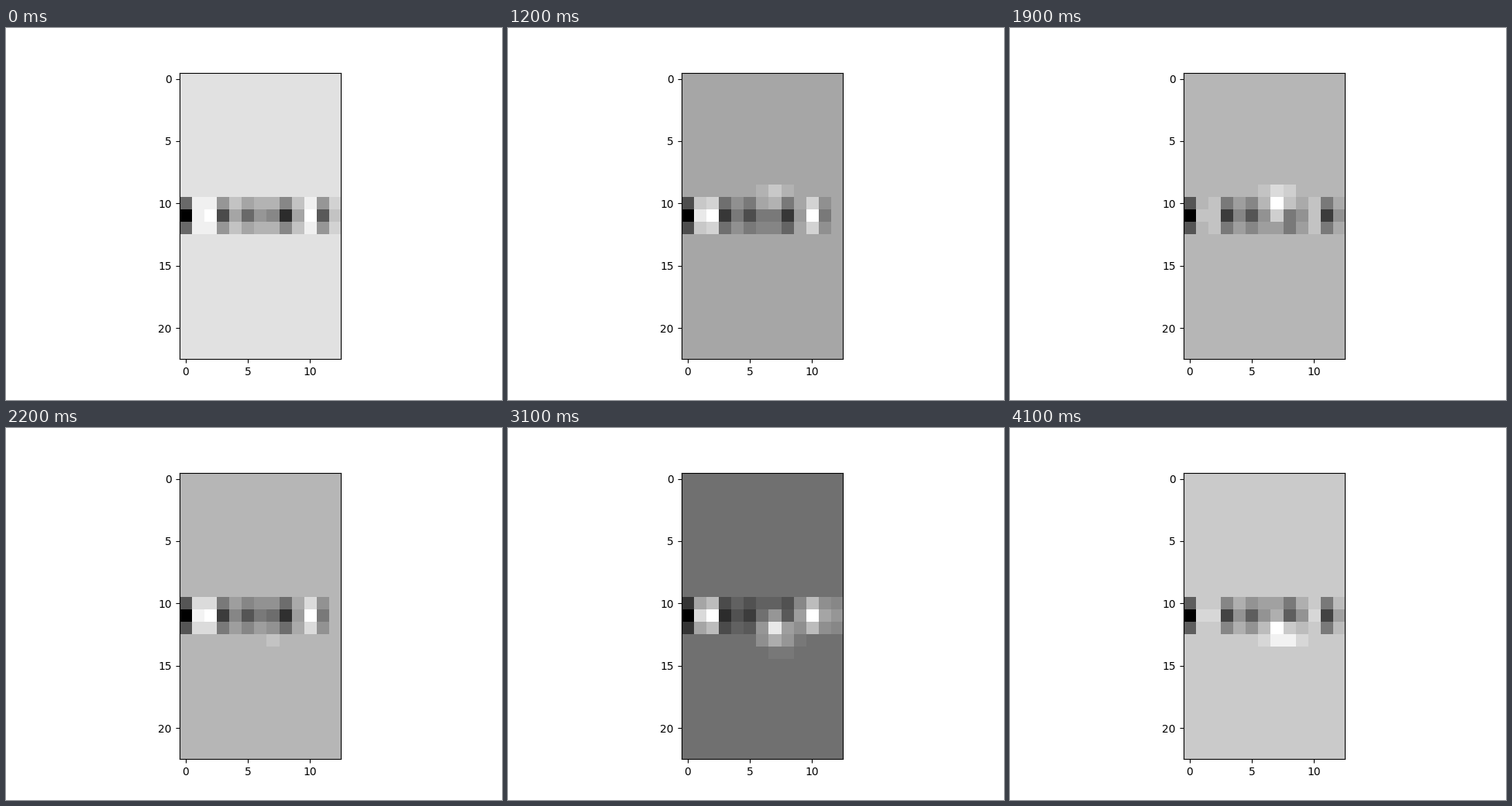
These frames come from a looping animation (640 by 480 pixels, 4200 ms). A matplotlib script:

```python
import numpy as np
import matplotlib.pyplot as plt
from matplotlib.animation import FuncAnimation

FRAMES, INTERVAL = 42, 100
row, col = np.mgrid[0:23, 0:13]

# dark marks along the middle row, fading into the rows beside it
MARKS = np.array([-15, 0, 0, -10, -4, -8, -5, -6, -12, -5, 0, -11, -3])
BAND = np.exp(-0.62 * (row - 11.0) ** 4)

# frame, pulse strength, spot strength, spot row, spot column
KEYS = np.array([
    (0, 2, 0, 9.8, 7),
    (12, 8.5, 4.6, 9.8, 7),
    (19, 1, 11, 10.4, 7.4),
    (22, 6.8, 1, 13, 7),
    (28, 0.8, 7.2, 12.1, 7.2),
    (31, 20, 19, 11.9, 7.1),
    (41, 0.8, 8, 11.9, 7.4),
])


def bell(x, center, width):
    return np.exp(-((x - center) / width) ** 2)


# the pulse lights one narrow and one wide group of columns
PULSE = 1.2 * bell(col, 1.6, 0.8) + bell(col, 10.4, 1.68)


def levels_at(n):
    if n == 7:   # one held beat
        n = 6
    pulse, glow, y, x = (np.interp(n, KEYS[:, 0], track)
                         for track in KEYS.T[1:])
    spot = glow * bell(row, y, 1.2) * bell(col, x, 1.2)
    return np.round(BAND * (MARKS + pulse * PULSE) + spot)


fig, ax = plt.subplots(figsize=(6.4, 4.8), dpi=100)
picture = ax.imshow(levels_at(0), cmap="gray", interpolation="nearest")


def update(n):
    levels = levels_at(n)
    picture.set_data(levels)
    picture.set_clim(levels.min(), levels.max())
    return [picture]


anim = FuncAnimation(fig, update, frames=FRAMES, interval=INTERVAL, repeat=True)
plt.show()
```
